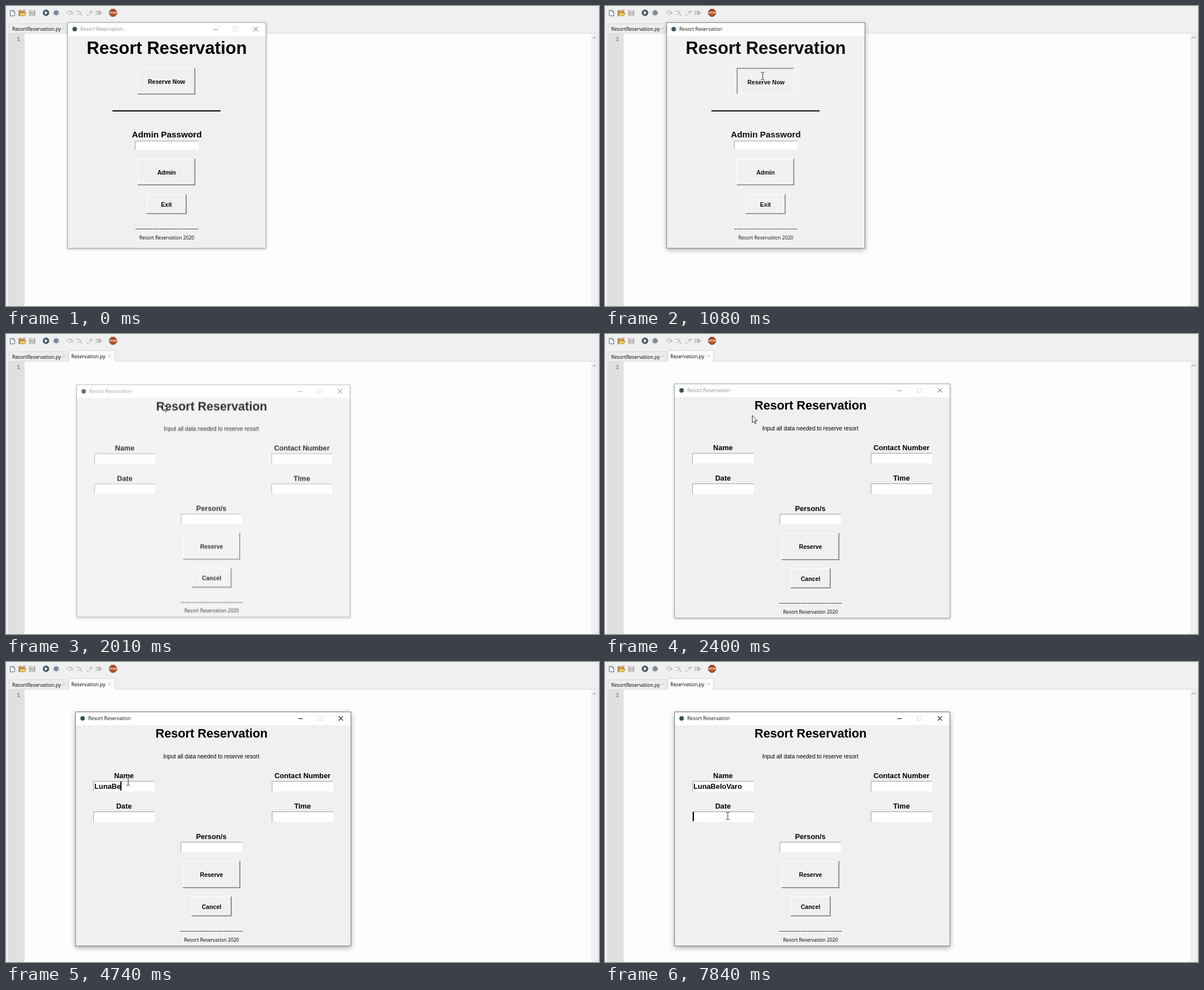
An HTML page that plays this animation: 1053x532 px, repeating every 8000 ms.

```html
<!DOCTYPE html>
<html lang="en">
<head>
<meta charset="utf-8">
<title>Resort Reservation</title>
<style>
  html, body { margin: 0; width: 100%; height: 100%; overflow: hidden; background: #f0f0f0; }
  svg { display: block; width: 100%; height: 100%; }
  text { white-space: pre; }
  .ui { font-family: "Open Sans", "Noto Sans", sans-serif; }
  .tk { font-family: "Liberation Sans", Arial, sans-serif; }
  .line { fill: none; stroke: currentColor; }
  .bar { color: #8e8e8e; }
  .frame { stroke: #adadad; filter: drop-shadow(0 1px 2px rgba(0, 0, 0, .3)); }
  #home { transform-origin: 285px 230px; }
  #form { transform-origin: 368px 296px; }
</style>
</head>
<body>
<svg id="stage" viewBox="0 0 1053 532"></svg>
<script>
const LOOP = 8000;
const stage = document.getElementById('stage');

// ---- drawing helpers ----
const rect = (x, y, w, h, fill, extra = '') =>
  `<rect x="${x}" y="${y}" width="${w}" height="${h}" fill="${fill}" ${extra}/>`;
const path = (d, color, width = 1, extra = '') =>
  `<path d="${d}" fill="none" stroke="${color}" stroke-width="${width}" ${extra}/>`;
const uiText = (x, y, size, text, extra = '') =>
  `<text class="ui" x="${x}" y="${y}" font-size="${size}" ${extra}>${text}</text>`;
const tkText = (cx, y, size, text, weight = 'bold') =>
  `<text class="tk" x="${cx}" y="${y}" font-size="${size}" font-weight="${weight}" text-anchor="middle">${text}</text>`;
const cross = (cx, cy, r, color, width) =>
  path(`M${cx - r} ${cy - r}l${2 * r} ${2 * r}m0 ${-2 * r}l${-2 * r} ${2 * r}`, color, width);

function button(x, y, w, h, label, sunken = false) {
  const [top, bottom] = sunken ? ['#777', '#fff'] : ['#fff', '#777'];
  const shift = sunken ? 1 : 0;
  return rect(x, y, w, h, '#f0f0f0') +
    path(`M${x + .6} ${y + h}V${y + .6}H${x + w}`, top, sunken ? 1.5 : 1) +
    path(`M${x} ${y + h - .7}H${x + w - .7}V${y}`, bottom, sunken ? 1 : 1.6) +
    tkText(x + w / 2 + shift, y + h / 2 + 4 + shift, 10.5, label);
}

const entry = (x, y, w, h) =>
  rect(x, y, w, h, '#fff') + path(`M${x + .5} ${y + h}V${y + .5}H${x + w}`, '#a0a0a0');

const footer = (cx, y) =>
  tkText(cx, y, 11.6, '-'.repeat(29), 'normal') +
  uiText(cx, y + 15.5, 8.6, 'Resort Reservation 2020', 'text-anchor="middle"');

function windowBox(id, x, y, w, h, body) {
  const mid = y + 12, right = x + w;
  return `<g id="${id}">
    ${rect(x + .5, y + .5, w - 1, h - 1, '#f0f0f0', 'class="frame"')}
    ${rect(x + 1, y + 1, w - 2, 23, '#fff')}
    <g class="bar">
      <circle cx="${x + 13}" cy="${mid}" r="4" fill="#39505c"/>
      ${uiText(x + 23, mid + 3, 8.65, 'Resort Reservation', 'fill="currentColor"')}
      <g class="controls">
        ${path(`M${right - 94} ${mid + .5}h8`, 'currentColor')}
        ${rect(right - 58.5, mid - 3.5, 7, 7, 'none', 'stroke="#ddd"')}
        ${cross(right - 18.5, mid, 3.8, 'currentColor', 1.1)}
      </g>
    </g>${body}</g>`;
}

// ---- scene ----
const bugLegs = Array.from({ length: 8 }, (_, i) =>
  `<path d="M0 0V-5.6" stroke="#3e5a74" transform="rotate(${i * 45})"/>`).join('');

const toolbar =
  '<path d="M7.5 7.5h5l3 3v7h-8z" fill="#fff" stroke="#4d6c7c"/>' +
  path('M12.5 7.5v3h3', '#4d6c7c') +
  '<path d="M23 17V8h4l1 1.5h5V12" fill="#d9a63c" stroke="#8a6420"/>' +
  '<path d="M23 17.3l3-5.3h10l-3 5.3z" fill="#f6d36b" stroke="#8a6420" stroke-width=".8"/>' +
  path('M30 7.5q3-2 4.500 .5', '#555') +
  rect(41, 7, 11, 11, '#b4b4b4') + rect(43.500, 7, 6, 4, '#dcdcdc') + rect(43, 13, 7, 5, '#cacaca') +
  '<circle cx="71" cy="12" r="5.8" fill="#435a64"/><path d="M69 8.800v6.400l5-3.200z" fill="#fff"/>' +
  `<g transform="translate(89 12)">${bugLegs}<circle r="3" fill="#7d9ab4" stroke="#3e5a74"/></g>` +
  path('M108.500 13q1-4 5-4t4 4m-2.500-1.500l2.500 2.500l2.500-2.500M112 15h3', '#bcbcbc', 1.500) +
  path('M125 9h4q3 0 3 4m-2-1l2 2l2-2M126 15h3M133 16h3', '#bcbcbc', 1.500) +
  path('M143 16h4M149 15v-5h4m-2-2l2 2l-2 2', '#bcbcbc', 1.500) +
  rect(159.500, 8, 2, 8, '#bcbcbc') + '<path d="M163 8h3l5 4l-5 4h-3z" fill="#bcbcbc"/>' +
  '<path d="M187.300 5.500h5.400l3.800 3.800v5.400l-3.800 3.800h-5.400l-3.800-3.800V9.300z" fill="#b5491f" stroke="#6e3a1a" stroke-width=".8"/>' +
  '<text class="tk" x="190" y="13.800" font-size="4.600" font-weight="bold" fill="#fff" text-anchor="middle">STOP</text>';

const editor =
  rect(0, 0, 1053, 532, '#f0f0f0') + toolbar +
  rect(5.5, 31.5, 105, 17, '#ededed', 'stroke="#dadada"') +
  rect(4.5, 48.5, 1047, 490, '#fdfdfd', 'stroke="#d9d9d9"') +
  rect(111.5, 29.5, 81, 20, '#fdfdfd') + path('M111.5 48.500V29.500H192.500V48.500', '#dadada') +
  rect(5, 49, 28, 483, '#e0e0e0') + rect(1039, 49, 12, 483, '#f0f0f0') +
  path('M1042 57.500l3-3l3 3', '#aaa', 1.2) +
  '<text x="19" y="62" font-size="10" font-weight="bold" fill="#8c8c8c" font-family="\'Liberation Mono\', monospace">1</text>' +
  uiText(11, 43.500, 8.75, 'ResortReservation.py') + cross(102.5, 40, 2.1, '#bbb', .9) +
  uiText(116, 43, 8.8, 'Reservation.py') + cross(184, 39.500, 2.1, '#aaa', .9);

const home = windowBox('home', 109, 29, 353, 401,
  tkText(285.5, 84.500, 31, 'Resort Reservation') +
  `<g id="raised">${button(234, 110, 102, 47, 'Reserve Now')}</g>` +
  `<g id="sunken">${button(234, 110, 102, 47, 'Reserve Now', true)}</g>` +
  rect(189, 185, 192, 2, '#000') +
  tkText(285.5, 233, 15.3, 'Admin Password') + entry(229, 239, 113, 16) +
  button(234, 271, 102, 47, 'Admin') + button(249.5, 334, 71, 35, 'Exit') +
  footer(285.5, 398));

const field = (x, y, label) => tkText(x + 54.5, y - 5, 12.8, label) + entry(x, y, 109, 18.5);

const form = windowBox('form', 123, 88, 490, 416,
  tkText(365, 134, 21.7, 'Resort Reservation') +
  tkText(364.5, 170.500, 10.1, 'Input all data needed to reserve resort', 'normal') +
  field(155, 211, 'Name') + field(472, 211, 'Contact Number') +
  field(155, 265, 'Date') + field(472, 265, 'Time') + field(310, 319, 'Person/s') +
  button(314, 353, 102, 48, 'Reserve') + button(329.5, 416, 71, 35, 'Cancel') +
  footer(365, 480));

const guest = 'LunaBeloVaro';
const typed = `<text id="typed" class="tk" x="157" y="224.5" font-size="12.8" font-weight="bold">${
  [...guest].map(c => `<tspan>${c}</tspan>`).join('')}</text>`;

const beamPath = 'M-3 -6.500h2l1 1l1-1h2M0-5.500v11M-3 6.500h2l1-1l1 1h2';
const pointers =
  `<g id="beam">${path(beamPath, '#fff', 2, 'opacity=".6"')}${path(beamPath, '#222', 1)}</g>` +
  '<g id="arrow"><path d="M-1.500-.500v12.500l2.900-2.700l2 4.700l2-.9l-2-4.500h4z" fill="#fff" stroke="#111" stroke-width=".9"/></g>';

stage.innerHTML = editor + home + form + typed + rect(-1, 212, 2, 16, '#000', 'id="caret"') + pointers;

// ---- motion ----
const $ = selector => stage.querySelector(selector);

// Holds each [ms, style] until the next one.
function hold(el, stops) {
  const frames = stops.map(([ms, style]) => ({ ...style, offset: ms / LOOP, easing: 'step-end' }));
  frames.push({ ...frames[frames.length - 1], offset: 1 });
  el.animate(frames, { duration: LOOP, iterations: Infinity });
}

// Visible only within the given [from, to] spans.
function show(el, spans, property = 'opacity') {
  const stops = spans[0][0] > 0 ? [[0, { [property]: 0 }]] : [];
  for (const [from, to] of spans) {
    stops.push([from, { [property]: 1 }]);
    if (to < LOOP) stops.push([to, { [property]: 0 }]);
  }
  hold(el, stops);
}

const move = (x, y) => ({ transform: `translate(${x}px, ${y}px)` });

function activate(id, ms) {
  hold($(`#${id} .bar`), [[0, { color: '#8e8e8e' }], [ms, { color: '#111' }]]);
  hold($(`#${id} .frame`), [
    [0, { stroke: '#adadad', filter: 'drop-shadow(0 1px 2px rgba(0,0,0,.3))' }],
    [ms, { stroke: '#777', filter: 'drop-shadow(0 3px 5px rgba(0,0,0,.32))' }]
  ]);
}

const fade = (opacity, scale) => ({ opacity, transform: `scale(${scale})` });

activate('home', 930);
show($('#raised'), [[0, 930]]);
show($('#sunken'), [[930, LOOP]]);
show($('#home .controls'), [[0, 1080]]);
hold($('#home'), [[0, fade(1, 1)], [1080, fade(.94, 1)], [1160, fade(.4, .96)], [1240, fade(0, .92)]]);

activate('form', 2790);
hold($('#form'), [[0, fade(0, .95)], [1920, fade(.4, .97)], [2010, fade(.8, .992)], [2100, fade(1, 1)]]);

const keyTimes = [3730, 3880, 4110, 4260, 4490, 4740, 4960, 5210, 5740, 5990, 6140, 6290];
stage.querySelectorAll('#typed tspan').forEach((key, i) => show(key, [[keyTimes[i], LOOP]], 'fillOpacity'));

const caretStops = keyTimes.map((ms, i) => [ms, move($('#typed').getEndPositionOfChar(i).x, 0)]);
hold($('#caret'), [[0, move(157, 0)], ...caretStops, [7300, move(157, 54)]]);
show($('#caret'), [[3340, 3420], [3730, 4350], [4580, 5280], [5510, 6140], [6370, 6920], [7300, LOOP]]);

// Stepped, eased pointer travel: list of [ms, x, y].
function glide(start, end, count, [x0, y0], [x1, y1]) {
  return Array.from({ length: count }, (_, i) => {
    const p = i / (count - 1), e = p * p * (3 - 2 * p);
    return [start + (end - start) * p, x0 + (x1 - x0) * e, y0 + (y1 - y0) * e];
  });
}

const route = [
  [0, 897, 512],
  ...glide(70, 840, 11, [897, 512], [280, 124]),
  ...glide(2180, 2640, 7, [280, 124], [213, 206]),
  [2940, 217, 213], [3420, 217, 212],
  ...glide(6920, 7610, 10, [217, 214], [218, 273])
].map(([ms, x, y]) => [ms, move(Math.round(x), Math.round(y))]);

hold($('#beam'), route);
hold($('#arrow'), route);
show($('#beam'), [[70, 610], [1080, 1770], [2940, 7150], [7380, LOOP]]);
show($('#arrow'), [[610, 1080], [1770, 2940], [7150, 7380]]);
</script>
</body>
</html>
```
